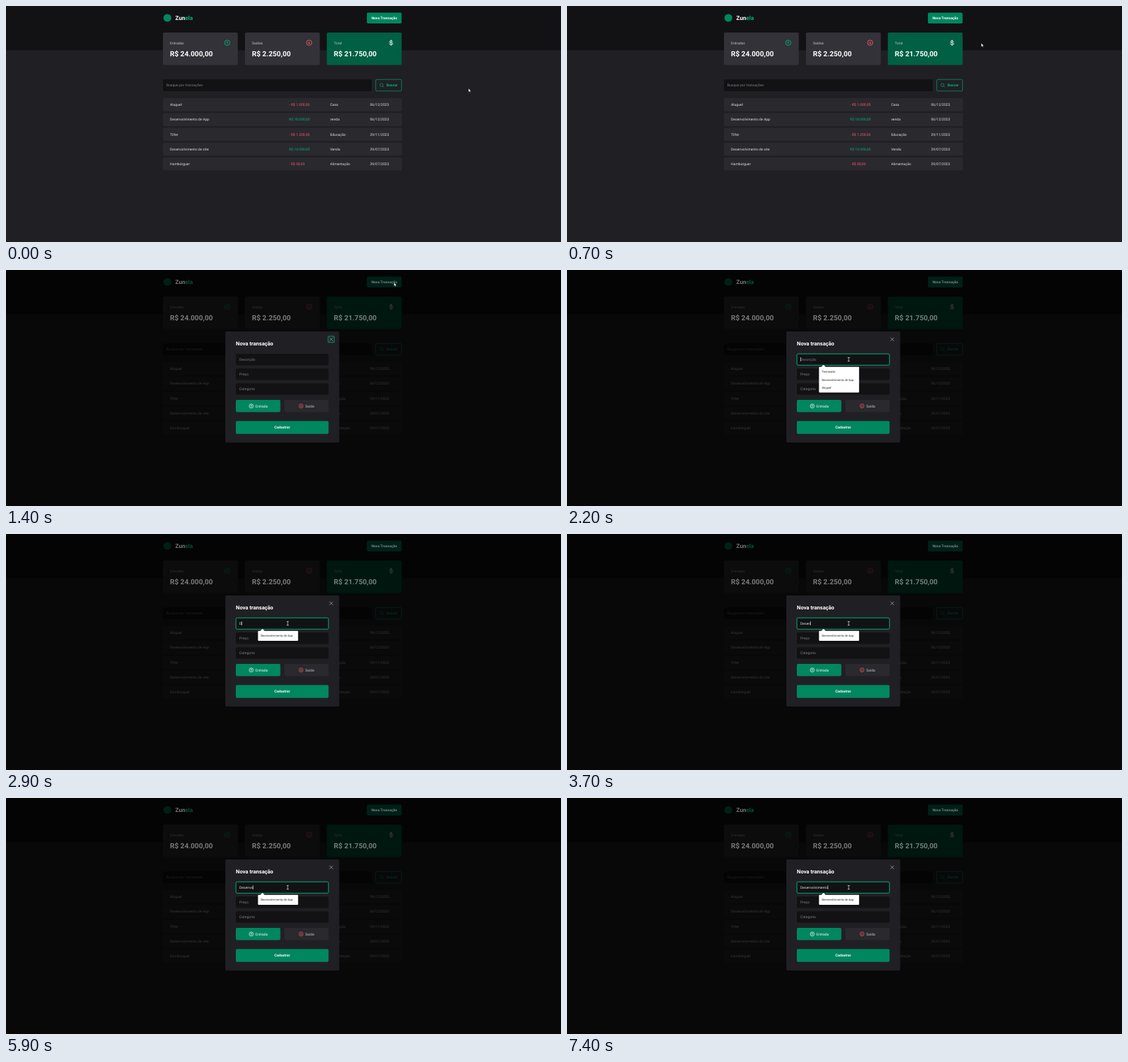
These frames come from a looping animation (792 by 338 pixels, 8000 ms). An HTML page:

```html
<!DOCTYPE html>
<html lang="pt-BR">
<head>
<meta charset="utf-8">
<title>Nova transação</title>
<style>
html, body { margin: 0; width: 100%; height: 100%; overflow: hidden; background: #202024; }
svg { display: block; width: 100vw; height: 100vh; }
text { font-family: Roboto, sans-serif; font-size: 5.09px; text-rendering: geometricPrecision; white-space: pre; }
.bold { font-weight: 700; }
.value { font-weight: 700; font-size: 10.18px; }
.title { font-weight: 700; font-size: 7.63px; }
.hint { font-size: 4.18px; }
</style>
</head>
<body>
<svg id="stage" viewBox="0 0 792 338"></svg>
<script>
const NS = "http://www.w3.org/2000/svg";
const stage = document.getElementById("stage");
const GREEN = "#00b37e", MID = "#00875f", DEEP = "#015f43", RED = "#f75a68";
const INK = "#121214", PANEL = "#202024", ROW = "#29292e", CARD = "#323238";
const SOFT = "#c4c4cc", MUTED = "#7c7c8a", LIGHT = "#e1e1e6", WHITE = "#fff";

function add(parent, tag, attrs, content) {
  const el = document.createElementNS(NS, tag);
  for (const key in attrs) el.setAttribute(key, attrs[key]);
  if (content) el.textContent = content;
  parent.append(el);
  return el;
}
const group = (parent, attrs) => add(parent, "g", attrs);
const box = (p, x, y, width, height, fill, more) =>
  add(p, "rect", { x, y, width, height, fill, rx: 1.8, ...more });
const label = (p, x, y, s, fill, cls = "", anchor = "start") =>
  add(p, "text", { x, y, fill, class: cls, "text-anchor": anchor }, s);
const line = (p, d, stroke, w = 0.7) =>
  add(p, "path", { d, stroke, "stroke-width": w, fill: "none", "stroke-linecap": "round", "stroke-linejoin": "round" });
const show = (el, on) => el.setAttribute("display", on ? "inline" : "none");

function arrowIcon(p, x, y, r, dir, color) {
  const g = group(p, { transform: `translate(${x} ${y}) scale(${r / 3.8})` });
  add(g, "circle", { r: 3.8, fill: "none", stroke: color, "stroke-width": 0.9 });
  line(g, `M0 ${1.6 * dir}V${-1.6 * dir}M-1.4 ${-0.2 * dir}L0 ${-1.6 * dir}L1.4 ${-0.2 * dir}`, color, 0.8);
}

// Page
const page = group(stage);
box(page, 0, 0, 792, 338, PANEL, { rx: 0 });
box(page, 0, 0, 792, 63.5, INK, { rx: 0 });
add(page, "circle", { cx: 230.3, cy: 17, r: 5.6, fill: MID });
const newButton = box(page, 515, 9.6, 49.5, 15.4, MID);

[[224, "Entradas", CARD], [341, "Saídas", CARD], [457.8, "Total", DEEP]].forEach(([x, name, fill]) => {
  box(page, x, 38, 106.8, 46.6, fill);
  label(page, x + 10, 54.5, name, SOFT);
});
arrowIcon(page, 315.7, 52.6, 3.8, 1, GREEN);
arrowIcon(page, 432.6, 52.6, 3.8, -1, RED);
line(page, "M549.5 48.8V56.4M551.8 51.2Q551.6 49.9 550 49.9H549Q547.3 49.9 547.3 51.3T549 52.6H550.2Q552 52.6 552 54T550.2 55.4H548.8Q547.1 55.4 547 54", WHITE, 0.8);

box(page, 224, 105, 298, 17, INK);
label(page, 228.8, 115.4, "Busque por transações", MUTED);
box(page, 527.6, 105.2, 36.8, 16.6, "none", { stroke: GREEN, "stroke-width": 0.6 });
add(page, "circle", { cx: 535.8, cy: 113.1, r: 2.2, fill: "none", stroke: GREEN, "stroke-width": 0.6 });
line(page, "M537.4 114.7L538.9 116.2", GREEN, 0.6);
label(page, 543, 115.4, "Buscar", GREEN, "bold");

[
  ["Aluguel", "- R$ 1.000,00", "Casa", "06/12/2023"],
  ["Desenvolvimento de App", "R$ 18.000,00", "venda", "06/12/2023"],
  ["Tilfer", "- R$ 1.200,00", "Educação", "29/11/2023"],
  ["Desenvolvimento de site", "R$ 14.000,00", "Venda", "29/07/2023"],
  ["Hambúrguer", "- R$ 50,00", "Alimentação", "29/07/2023"]
].forEach(([name, price, kind, date], i) => {
  const y = 141.4 + i * 21.2;
  box(page, 224, y - 9.3, 341, 18.6, ROW);
  label(page, 234, y + 1.8, name, LIGHT);
  label(page, 404, y + 1.8, price, price[0] === "-" ? RED : GREEN);
  label(page, 462.4, y + 1.8, kind, LIGHT);
  label(page, 519.5, y + 1.8, date, LIGHT);
});

// Dimming, with the strong texts fading less than the rest
const shade = box(stage, 0, 0, 792, 338, "#000", { rx: 0, opacity: 0.76 });
const strong = group(stage);
const brand = label(strong, 241.5, 19.9, "", WHITE, "bold");
brand.style.fontSize = "8.2px";
add(brand, "tspan", {}, "Zun");
add(brand, "tspan", { fill: GREEN }, "ela");
label(strong, 539.8, 19, "Nova Transação", WHITE, "bold", "middle");
label(strong, 234, 72.2, "R$ 24.000,00", WHITE, "value");
label(strong, 351, 72.2, "R$ 2.250,00", WHITE, "value");
label(strong, 467.8, 72.2, "R$ 21.750,00", WHITE, "value");

// Modal
const modal = group(stage);
box(modal, 313, 88, 162.5, 159, PANEL);
label(modal, 328, 107.8, "Nova transação", WHITE, "title");
const closeRing = box(modal, 459.8, 94.9, 8.6, 8.8, "none", { rx: 0.3, stroke: GREEN, "stroke-width": 0.8 });
line(modal, "M461.9 97.1L466.3 101.5M466.3 97.1L461.9 101.5", SOFT, 0.6);
["Descrição", "Preço", "Categoria"].forEach((name, i) => {
  const y = 120 + i * 21.1;
  box(modal, 328, y, 132.3, 16.4, INK);
  const text = label(modal, 333, y + 10, name, MUTED);
  if (!i) text.id = "placeholder";
});
const placeholder = document.getElementById("placeholder");
const fieldRing = box(modal, 328.1, 120.1, 132.1, 16.2, "none", { stroke: GREEN, "stroke-width": 0.95 });
const typed = label(modal, 333, 130, "", LIGHT);
const caret = box(modal, 333, 125.1, 0.6, 5.7, WHITE, { rx: 0 });
box(modal, 328, 186, 63.5, 17.4, MID);
arrowIcon(modal, 350, 194.8, 2.9, 1, WHITE);
label(modal, 356.1, 196.7, "Entrada", WHITE);
box(modal, 397, 186, 63.3, 17.4, ROW);
arrowIcon(modal, 421, 194.8, 2.9, -1, RED);
label(modal, 427.1, 196.7, "Saída", SOFT);
box(modal, 328, 216.2, 132.3, 18.6, MID);
label(modal, 394.2, 227.4, "Cadastrar", WHITE, "bold", "middle");

// Suggestions
const hints = group(stage);
add(hints, "path", { d: "M362.8 139L366 135.8L369.2 139Z", fill: WHITE });
const hintBox = box(hints, 359.6, 138.7, 57.2, 36.7, WHITE, { rx: 1 });
const hintTexts = ["Testanado", "Desenvolvimento de App", "Aluguel"].map((s, i) =>
  label(hints, 363.4, 147.3 + i * 11.5, s, "#2b2b30", "hint"));

// Pointers
const pointer = group(stage);
const arrow = add(pointer, "path", { d: "M0 0V5.2L1.2 4.1L2 5.9L2.9 5.5L2.1 3.8H3.7Z", fill: WHITE, stroke: "#000", "stroke-width": 0.35 });
const hand = add(pointer, "path", { d: "M-.6 0Q0 -.7 .5 0V2.1L2.9 2.7Q3.5 3 3.3 3.8L2.7 6.5H-.2L-2 4.1Q-1.5 3.2 -.6 4Z", fill: WHITE, stroke: "#000", "stroke-width": 0.35 });
const beam = line(pointer, "M-1.1 -2.6H1.1M0 -2.6V2.6M-1.1 2.6H1.1", LIGHT, 0.7);

// Time at which each number of letters is reached
const WORD = "Desenvolvimento";
const KEYS = [2800, 3100, 3300, 3500, 3700, 5500, 5900, 6200, 6500, 6600, 6800, 7100, 7300, 7400, 7400];

const clamp = v => Math.max(0, Math.min(1, v));
const ease = v => v * v * (3 - 2 * v);
const mix = (a, b, v) => a + (b - a) * v;

function render(ms) {
  const t = Math.floor(ms / 100) * 100;
  const open = t >= 1400, focused = t >= 2200;
  const count = KEYS.filter(k => k <= t).length;

  const go = ease(clamp((t - 400) / 500)), down = ease(clamp((t - 1600) / 500));
  const x = mix(mix(660, 553.7, go), 402, down);
  const y = mix(mix(118, 18, go), 128, down);
  const onButton = !open && x < 564.5 && y < 25;
  const onField = open && x < 460 && y > 120;
  pointer.setAttribute("transform", `translate(${x} ${y})`);
  show(hand, onButton);
  show(beam, onField);
  show(arrow, !onButton && !onField);

  newButton.setAttribute("fill", onButton ? DEEP : MID);
  newButton.setAttribute("stroke", t === 1300 ? GREEN : "none");
  newButton.setAttribute("stroke-width", 0.7);

  show(shade, open);
  show(modal, open);
  strong.setAttribute("opacity", open ? 0.45 : 1);
  show(closeRing, open && !focused);
  show(fieldRing, focused);
  show(placeholder, !count);
  typed.textContent = WORD.slice(0, count);

  const since = t - (count ? KEYS[count - 1] : 2200);
  show(caret, focused && since % 1000 < 500);
  caret.setAttribute("x", 333 + (count ? typed.getComputedTextLength() : 0));

  show(hints, focused);
  const few = count > 0;
  hintBox.setAttribute("height", few ? 14.2 : 36.7);
  hintTexts.forEach((el, i) => show(el, few ? i === 1 : true));
  hintTexts[1].setAttribute("y", few ? 147.3 : 158.8);
}

const start = performance.now();
function tick(now) {
  render(Math.max(0, now - start) % 8000);
  requestAnimationFrame(tick);
}
render(0);
requestAnimationFrame(tick);
</script>
</body>
</html>
```
